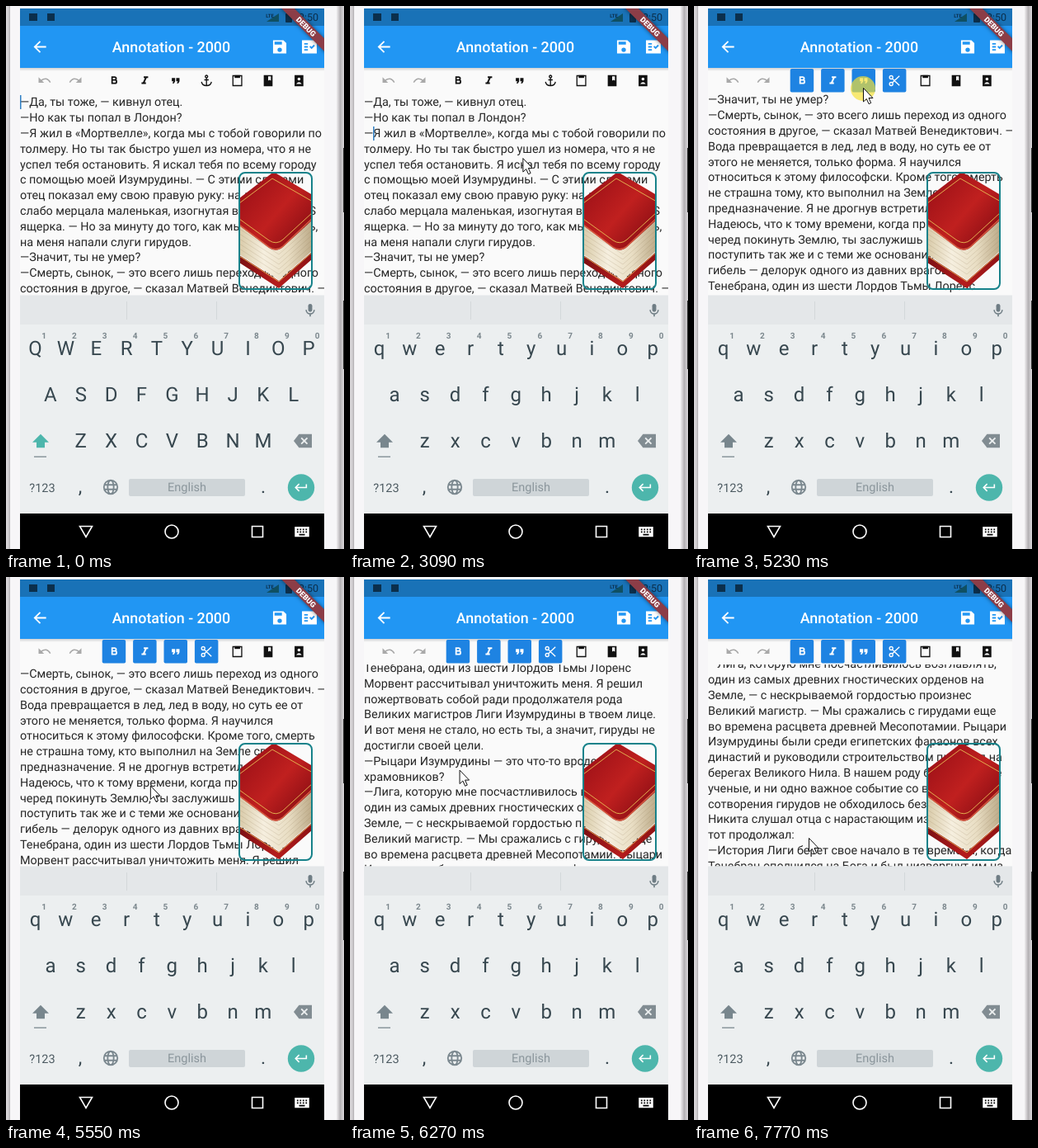
An HTML page with a canvas for the animation above (8 s loop, 410 px wide and 658 px high).

```html
<!DOCTYPE html>
<html lang="ru">
<head>
<meta charset="utf-8">
<title>Annotation editor</title>
<style>
html, body { margin: 0; width: 100%; height: 100%; overflow: hidden; background: #fff; }
canvas { display: block; }
</style>
</head>
<body>
<canvas id="stage" width="410" height="658"></canvas>
<script>
const ctx = document.getElementById('stage').getContext('2d');
const LOOP = 8000, STEP = 79.3, FIRST = 70;
const LEFT = 17, RIGHT = 386, WIDTH = RIGHT - LEFT, LINE = 18.8, PITCH = 36.85;
const FONT = 'Roboto, "Open Sans", sans-serif';
const INK = '#111', KEY = '#37474f', TEAL = '#4db6ac', BLUE = '#2196f3', BOARD = '#eceff0';

const LINES = `—Да, ты тоже, — кивнул отец.
—Но как ты попал в Лондон?
—Я жил в «Мортвелле», когда мы с тобой говорили по
толмеру. Но ты так быстро ушел из номера, что я не
успел тебя остановить. Я искал тебя по всему городу
с помощью моей Изумрудины. — С этими словами
отец показал ему свою правую руку: на ладони
слабо мерцала маленькая, изогнутая в виде буквы S
ящерка. — Но за минуту до того, как мы встретились,
на меня напали слуги гирудов.
—Значит, ты не умер?
—Смерть, сынок, — это всего лишь переход из одного
состояния в другое, — сказал Матвей Венедиктович. —
Вода превращается в лед, лед в воду, но суть ее от
этого не меняется, только форма. Я научился
относиться к этому философски. Кроме того, смерть
не страшна тому, кто выполнил на Земле свое
предназначение. Я не дрогнув встретил ее.
Надеюсь, что к тому времени, когда придет твой
черед покинуть Землю, ты заслужишь право
поступить так же и с теми же основаниями. Моя
гибель — делорук одного из давних врагов
Тенебрана, один из шести Лордов Тьмы Лоренс
Морвент рассчитывал уничтожить меня. Я решил
пожертвовать собой ради продолжателя рода
Великих магистров Лиги Изумрудины в твоем лице.
И вот меня не стало, но есть ты, а значит, гируды не
достигли своей цели.
—Рыцари Изумрудины — это что-то вроде
храмовников?
—Лига, которую мне посчастливилось возглавлять,
один из самых древних гностических орденов на
Земле, — с нескрываемой гордостью произнес
Великий магистр. — Мы сражались с гирудами еще
во времена расцвета древней Месопотамии. Рыцари
Изумрудины были среди египетских фараонов всех
династий и руководили строительством пирамид на
берегах Великого Нила. В нашем роду были великие
ученые, и ни одно важное событие со времен
сотворения гирудов не обходилось без нас.
Никита слушал отца с нарастающим изумлением, а
тот продолжал:
—История Лиги берет свое начало в те времена, когда
Тенебран ополчился на Бога и был низвергнут им на`.split('\n');

// Path builders for icons on a 24-unit grid
const box = (x, y, w, h) => `M${x} ${y}h${w}v${h}h${-w}z`;
const ring = (x, y, r, ry = r) => `M${x - r} ${y}a${r} ${ry} 0 1 0 ${2 * r} 0 ${r} ${ry} 0 1 0 ${-2 * r} 0z`;
const grid = (xs, ys, w, h) => xs.flatMap(x => ys.map(y => box(x, y, w, h))).join('');

const ICONS = {
  back: { line: 'M20 12H5M12 4.5L4.5 12l7.5 7.5' },
  save: { fill: 'M3 3h14l4 4v14H3z' + box(5, 5, 10, 4) + ring(12, 16, 3) },
  check: { fill: box(2, 3, 20, 18) + grid([5], [7, 11, 15], 5, 2) + 'M12 12l3 3 4.5-4.5L18 9l-3 3-1.5-1.5z' },
  undo: { fill: 'M2 7v9h9z', line: 'M6 12.5q9-7 15 3' },
  bold: { line: 'M8.5 5.3h4.7a2.7 2.7 0 0 1 0 5.4H8.5h5.2a3 3 0 0 1 0 6H8.5z', width: 2.6 },
  italic: { line: 'M10 5.5h8M14.5 5.5l-5 11M6 16.5h8', width: 3 },
  quote: { fill: 'M5 7h6v6l-2 4H6l2-4H5zM13 7h6v6l-2 4h-3l2-4h-3z' },
  anchor: { line: ring(12, 4.5, 2.2) + 'M12 7v14M8 10.5h8M3 14q1 7 9 7t9-7' },
  cut: { line: ring(6, 6, 3) + ring(6, 18, 3) + 'M8 8.2l13 12.3M8 15.8L21 3.5' },
  paste: { fill: box(7, 2, 10, 5), line: box(4, 3, 16, 18) },
  book: { fill: box(4, 2, 16, 20) + 'M12 4h5v8l-2.5-1.5L12 12z' },
  person: { fill: box(4, 2, 16, 20) + ring(12, 9, 2.7) + 'M7 18q5-7 10 0z' },
  mic: { fill: 'M9 5a3 3 0 0 1 6 0v6a3 3 0 0 1-6 0z', line: 'M6 11a6 6 0 0 0 12 0M12 17v4' },
  erase: { fill: 'M7 3h17v18H7L0 12z' },
  cross: { line: 'M10 8l8 8M18 8l-8 8' },
  enter: { line: 'M20 7v5H4M9 6.5L3.5 12 9 17.5' },
  shift: { fill: 'M12 2L0 14h6v8h12v-8h6z' },
  globe: { line: ring(12, 12, 9) + ring(12, 12, 4, 9) + 'M4 9h16M4 15h16' },
  keys: { fill: box(2, 5, 20, 14) + grid([5, 9, 13, 17], [8, 11.5], 2, 2) + box(8, 15, 8, 2) }
};

const clamp = k => Math.max(0, Math.min(1, k));
const easeOut = k => 1 - (1 - k) ** 2;
const settle = k => 1 - (1 - k) ** 3;
const smooth = k => k * k * (3 - 2 * k);

const HOME = { x: 342, y: 562 };
const MOVES = [
  { at: 70, end: 1260, x: 28, y: 153, ease: settle },
  { at: 2370, end: 2790, x: 145, y: 292 },
  { at: 2790, end: 3320, x: 256, y: 106 },
  { at: 3800, end: 4510, x: 209, y: 262 },
  { at: 4510, end: 4670, x: 215, y: 300 },
  { at: 4980, end: 5224, x: 205, y: 99 },
  { at: 5224, end: 5740, x: 160, y: 328 },
  { at: 5850, end: 6100, x: 128, y: 125 },
  { at: 6100, end: 6290, x: 133, y: 244 },
  { at: 6690, end: 6890, x: 133, y: 111 },
  { at: 6950, end: 7760, x: 139, y: 316 }
];
const DRAGS = [{ at: 4980, by: 206 }, { at: 5850, by: 214 }, { at: 6690, by: 155 }];
const PRESSES = [{ at: 1730, hold: 160 }, { at: 3315, hold: 475 }, ...DRAGS.map(d => ({ at: d.at, hold: 250 }))];

const LOWER_AT = 2050, FORMAT_AT = 3870;

function pointerAt(t) {
  let { x, y } = HOME;
  for (const m of MOVES) {
    const k = (m.ease || smooth)(clamp((t - m.at) / (m.end - m.at)));
    x += (m.x - x) * k;
    y += (m.y - y) * k;
  }
  return [x, y];
}

const scrollAt = t => DRAGS.reduce((sum, d) => sum + d.by * easeOut(clamp((t - d.at) / 335)), 0);

function rect(x, y, w, h, color) {
  ctx.fillStyle = color;
  ctx.fillRect(x, y, w, h);
}

function round(x, y, w, h, r, color) {
  ctx.beginPath();
  ctx.roundRect(x, y, w, h, r);
  ctx.fillStyle = color;
  ctx.fill();
}

function disc(x, y, r, color) {
  ctx.beginPath();
  ctx.arc(x, y, r, 0, 7);
  ctx.fillStyle = color;
  ctx.fill();
}

function fade(x1, y1, x2, y2, ...colors) {
  const g = ctx.createLinearGradient(x1, y1, x2, y2);
  colors.forEach((c, i) => g.addColorStop(i / (colors.length - 1), c));
  return g;
}

function shape(d, fill, stroke, width = 1) {
  const p = new Path2D(d);
  if (fill) { ctx.fillStyle = fill; ctx.fill(p, 'evenodd'); }
  if (stroke) { ctx.strokeStyle = stroke; ctx.lineWidth = width; ctx.stroke(p); }
}

function text(s, x, y, size, color, align = 'center', weight = 400) {
  ctx.font = `${weight} ${size}px ${FONT}`;
  ctx.textAlign = align;
  ctx.fillStyle = color;
  ctx.fillText(s, x, y);
}

function icon(name, x, y, size, color, flip = 1) {
  const { fill, line, width = 2 } = ICONS[name];
  ctx.save();
  ctx.translate(x, y);
  ctx.scale(flip * size / 24, size / 24);
  ctx.translate(-12, -12);
  if (fill) shape(fill, color);
  if (line) shape(line, null, color, width);
  ctx.restore();
}

function phone() {
  rect(0, 0, 410, 658, '#f7f6f8');
  rect(0, 0, 5, 658, fade(0, 0, 5, 0, '#dcd9dc', '#d2cfd2', '#b4b1b4'));
  rect(401, 0, 9, 658, fade(401, 0, 410, 0, '#f0eef0', '#b4b1b4', '#dcd9dc'));
  rect(409, 172, 1, 78, '#333');
  rect(409, 357, 1, 83, '#333');
  rect(LEFT, 3, WIDTH, 612, '#fafafa');
}

function story(t) {
  const scroll = scrollAt(t);
  ctx.save();
  ctx.beginPath();
  ctx.rect(LEFT, 106, WIDTH, 244.5);
  ctx.clip();
  LINES.forEach((s, i) => text(s, LEFT, 121.4 + i * LINE - scroll, 14.37, '#262626', 'left'));

  const moved = t >= LOWER_AT;
  const beat = Math.floor((t - (moved ? 1900 : 70)) / 500);
  if ((beat % 2 === 0) === moved) {
    const [x, y] = moved ? [28, 146] : [17, 108];
    rect(x, y - scroll, 1.5, 17, '#2f7fc4');
  }
  ctx.restore();
}

function toolbar(active) {
  const slot = i => 131 + i * 37.4;
  icon('undo', 47, 90, 18, '#a9a9a9');
  icon('undo', 84, 90, 18, '#a9a9a9', -1);
  ['bold', 'italic', 'quote', active ? 'cut' : 'anchor', 'paste', 'book', 'person'].forEach((name, i) => {
    const on = active && i < 4;
    if (on) round(slot(i) - 14.3, 76, 28.5, 28.5, 2, '#1e83e2');
    icon(name, slot(i), 90.5, 16, on ? '#fff' : INK);
  });
}

function ribbon() {
  ctx.save();
  ctx.beginPath();
  ctx.rect(LEFT, 3, WIDTH, 72);
  ctx.clip();
  ctx.translate(RIGHT, 3);
  ctx.rotate(Math.PI / 4);
  ctx.shadowColor = 'rgba(0,0,0,.5)';
  ctx.shadowBlur = 5;
  rect(-40, 25.6, 80, 11, '#8c3d47');
  ctx.shadowBlur = 0;
  text('DEBUG', 0, 34.4, 9.2, '#fff', 'center', 900);
  ctx.restore();
}

function header() {
  rect(LEFT, 75, WIDTH, 4, fade(0, 75, 0, 79, 'rgba(0,0,0,.16)', 'rgba(0,0,0,0)'));
  rect(LEFT, 24, WIDTH, 51, BLUE);
  rect(LEFT, 3, WIDTH, 21, '#1972b7');
  const dark = '#0b2f4c';
  rect(28, 9, 10, 9, dark);
  rect(50, 9, 9, 9, dark);
  shape('M316 19h15V9z', '#0f5063');
  text('LTE', 320, 14, 6, dark, 'center', 700);
  round(339, 9, 8, 11, 1, dark);
  rect(341, 7.5, 4, 2, dark);
  text('8:50', 379, 18, 12.5, dark, 'right');

  icon('back', 41.5, 49.5, 21.5, '#fff');
  text('Annotation - 2000', 200.5, 56, 17.9, '#fff', 'center', 500);
  icon('save', 332, 49.5, 21.5, '#fff');
  icon('check', 368, 49.5, 21.5, '#fff');
  ribbon();
}

function cover() {
  const frame = new Path2D();
  frame.roundRect(283, 202, 88, 141, 7);
  // Every layer of the book follows the same bent edge
  const edge = y => `M283 ${y}L331 ${y + 31} 372 ${y - 5}`;
  const slab = (y, h, fill) => shape(`${edge(y)}V${y + h - 5}L331 ${y + h + 31} 283 ${y + h}z`, fill);

  ctx.save();
  ctx.clip(frame);
  slab(302, 9, fade(283, 0, 372, 0, '#7c1014', '#b51c1c', '#8e1215'));
  shape(edge(303), null, '#d8a24e');
  slab(264, 37, fade(283, 0, 372, 0, '#d9cba9', '#f6efdf', '#e9dec4', '#bba987'));
  for (let y = 270; y < 300; y += 6) shape(edge(y), null, 'rgba(135,110,75,.25)', .7);
  const red = fade(290, 220, 365, 285, '#a01218', '#c0201f', '#860c13');
  shape('M283 233L322 203H328L372 229V259L336 292Q328 299 319 293L283 266z', red);
  shape('M283 265L319 292Q328 298 336 291L372 257', null, '#d65b40', 1.5);
  shape('M283 239L323 209 372 237M283 258L319 284Q328 290 336 283L372 250', null, '#e2ad4f');
  ctx.restore();
  ctx.strokeStyle = '#17828a';
  ctx.lineWidth = 2;
  ctx.stroke(frame);
}

function keyboard(lower) {
  rect(LEFT, 350.5, WIDTH, 36, '#e4e7e9');
  rect(LEFT, 386, WIDTH, 229, BOARD);
  for (const x of [146, 255]) rect(x, 358, 1, 22, '#d3d8da');
  icon('mic', 369, 369, 19.5, '#6f7d84');

  ['QWERTYUIOP', 'ASDFGHJKL', 'ZXCVBNM'].forEach((row, r) =>
    [...(lower ? row.toLowerCase() : row)].forEach((c, i) =>
      text(c, 35.5 + (r + 1 >> 1) * PITCH / 2 + (r === 2 ? PITCH : 0) + i * PITCH, 422.5 + r * 56.3, 24, KEY)));
  [...'1234567890'].forEach((c, i) => text(c, 46 + i * PITCH, 403, 10, '#7b878d', 'center', 700));

  icon('shift', 42, 527, 20, lower ? '#78868d' : TEAL);
  rect(34, 545.5, 15, 1.5, '#8b979d');
  icon('erase', 360, 527, 22, '#818c92');
  icon('cross', 360, 527, 22, BOARD);

  text('?123', 44, 588.5, 14.5, '#4c5a61');
  text(',', 90, 590, 23, KEY);
  icon('globe', 127, 583, 22, '#7b888f');
  round(149, 573, 141, 21, 2, '#cfd5d8');
  text('English', 219.5, 588, 14.5, '#8b969c');
  text('.', 312, 590, 23, KEY);
  disc(358, 583.5, 16.2, TEAL);
  icon('enter', 358, 583.5, 19, '#fff');

  rect(LEFT, 615, WIDTH, 43, '#000');
  shape('M89.5 630.5h15L97 643.5z' + ring(201, 637, 8) + box(298.5, 630.5, 13, 13), null, '#fff', 1.6);
  icon('keys', 359, 637, 21, '#fff');
}

function pointer(t) {
  if (t < FIRST) return;
  const [x, y] = pointerAt(t);
  if (PRESSES.some(p => t >= p.at && t < p.at + p.hold)) disc(x, y + 1, 15, 'rgba(246,224,50,.68)');
  ctx.save();
  ctx.translate(x + .5, y + .5);
  shape('M0 0V16.5L3.8 13 6.6 19.2 9.2 18 6.5 12H11.5z', '#fff', '#111');
  ctx.restore();
}

function draw(now) {
  const step = Math.floor((now % LOOP - FIRST) / STEP + .1);
  const t = step < 0 ? 0 : FIRST + step * STEP;
  phone();
  story(t);
  header();
  toolbar(t >= FORMAT_AT);
  cover();
  keyboard(t >= LOWER_AT);
  pointer(t);
}

ctx.textRendering = 'geometricPrecision';
const start = performance.now();
function loop() {
  draw(performance.now() - start);
  requestAnimationFrame(loop);
}
loop();
</script>
</body>
</html>
```
